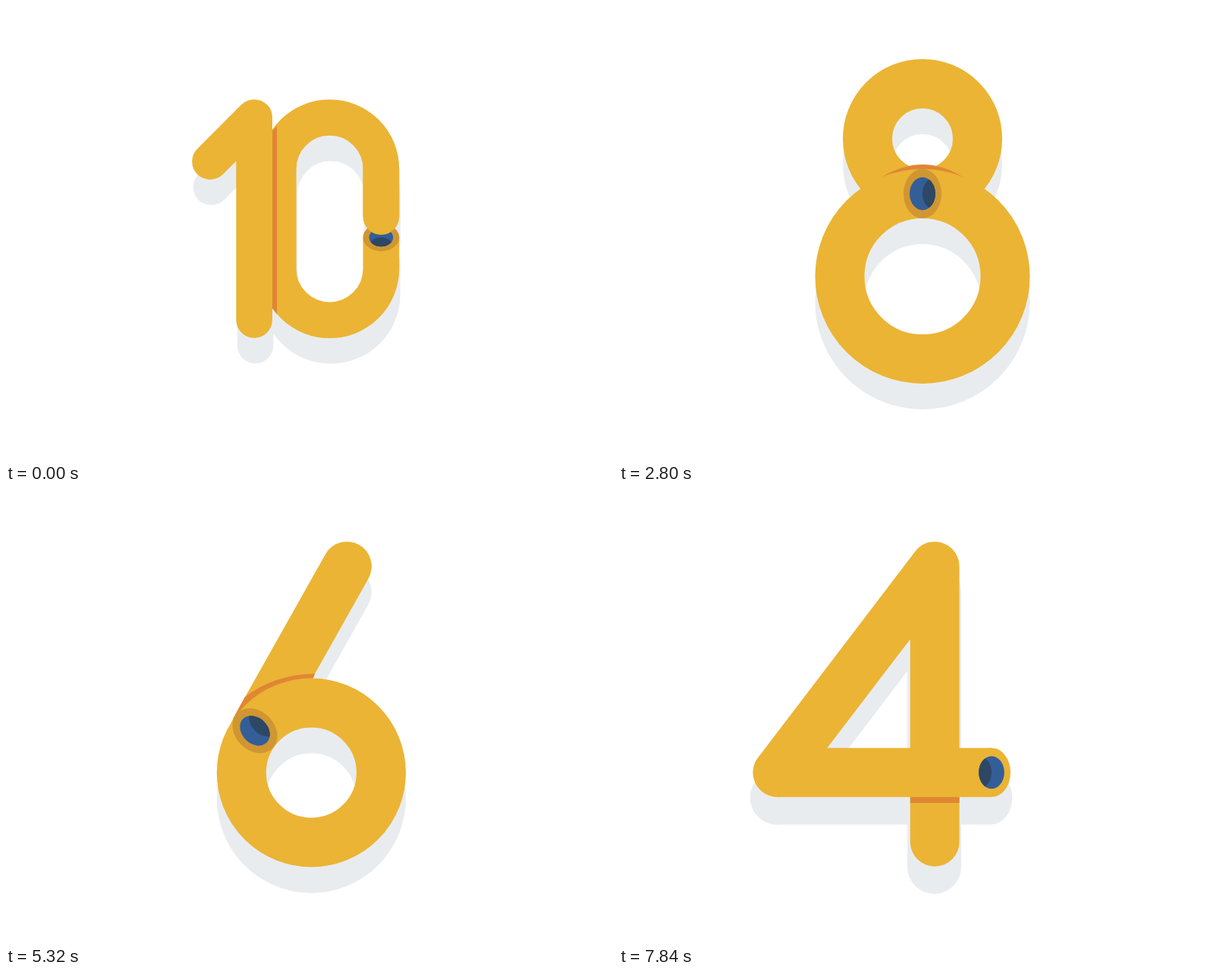
These frames come from a looping animation (800x600 px, 8 s). An HTML page with a canvas:

```html
<!DOCTYPE html>
<html lang="en">
<head>
<meta charset="utf-8">
<title>Countdown</title>
<style>
  html, body { margin: 0; height: 100%; overflow: hidden; background: #fff; }
  canvas { display: block; }
</style>
</head>
<body>
<canvas id="stage" width="800" height="600"></canvas>
<script>
const ctx = document.getElementById('stage').getContext('2d');
const YELLOW = '#ebb434', ORANGE = '#e08635', RIM = '#cf9632';
const BLUE = '#345e98', NAVY = '#2d4764', GREY = '#e9ecef';
const LOOP = 8000, STEP = 70, STEPS_PER_DIGIT = 18;
const POP = [0.767, 0.97, 1.0935, 1.07, 1];

// Every part is a function of the pen: { width, extra, shade }.
const tube = (d, cap = 'round') => {
  const path = new Path2D(d);
  return pen => {
    ctx.lineCap = cap;
    ctx.lineJoin = 'round';
    ctx.lineWidth = pen.width + pen.extra;
    ctx.strokeStyle = pen.shade ? GREY : YELLOW;
    ctx.stroke(path);
  };
};

const ring = (x, y, r) =>
  tube(`M${x - r} ${y}a${r} ${r} 0 1 0 ${2 * r} 0a${r} ${r} 0 1 0 ${-2 * r} 0Z`);

const crease = d => {
  const path = new Path2D(d);
  return pen => {
    if (pen.shade) return;
    ctx.fillStyle = ORANGE;
    ctx.fill(path);
  };
};

function oval(x, rx, ry, color) {
  ctx.beginPath();
  ctx.ellipse(x, 0, rx, ry, 0, 0, 2 * Math.PI);
  ctx.fillStyle = color;
  ctx.fill();
}

// Open end of a tube; its dark inside lies towards the given angle.
const mouth = (x, y, rx, ry, hx, hy, degrees, rim = YELLOW) => pen => {
  const grow = pen.extra / 2;
  ctx.save();
  ctx.translate(x, y);
  ctx.rotate(degrees * Math.PI / 180);
  oval(0, rx + grow, ry + grow, pen.shade ? GREY : rim);
  if (!pen.shade) {
    oval(0, hx, hy, BLUE);
    ctx.clip();
    oval(hx, hx, hy, NAVY);
  }
  ctx.restore();
};

const ten = {
  size: 1.07, center: [384, 298], width: 66.5, shadow: [2, 47, 0],
  parts: [
    tube('M538 308V365.6A94.6 94.6 0 0 1 348.8 365.6V182A94.6 94.6 0 0 1 538 182V270', 'butt'),
    mouth(538, 308, 25.5, 33.3, 17, 22, 90, RIM),
    tube('M538 182V270'),
    crease('M337 113L346.5 103V449.5L337 437Z'),
    tube('M223.6 168.4L304.7 87.3V459.8')
  ]
};

const nine = {
  size: 1.07, center: [400, 300], width: 69.4, shadow: [-2, 42.5, 0],
  parts: [
    tube('M481 247L351.6 477.2'),
    crease('M400 318L512 262L495.5 293Q455 325 396.5 326.2Z'),
    ring(401.7, 187, 98.2),
    mouth(481, 246, 27.6, 35, 18.1, 23.6, 135, RIM)
  ]
};

const eight = {
  size: 1, center: [400, 300], width: 65, shadow: [0, 34, 0],
  parts: [
    ring(400, 175, 72.5),
    crease('M346 226Q400 192 454 226L440 240H360Z'),
    ring(400, 356.5, 109),
    mouth(400, 247.5, 25, 32.5, 17, 21.7, 0, RIM)
  ]
};

const seven = {
  size: 0.767, center: [405, 298], width: 49.5, shadow: [0.5, 25, 0],
  parts: [
    tube('M321 147.6H476', 'butt'),
    tube('M476 147.6L348.6 427'),
    mouth(320.8, 147.6, 19.4, 24.75, 12.8, 16.5, 0)
  ]
};

// The nine turned upside down.
const six = {
  ...nine, size: 1, center: [402, 303], shadow: [0, -36.3, 0],
  place() {
    ctx.translate(402.4, 374);
    ctx.scale(-0.9375, -0.9375);
    ctx.translate(-401.7, -187);
  }
};

const five = {
  size: 1.07, center: [400, 300], width: 69.7, shadow: [0.8, 36, 2.4],
  parts: [
    tube('M322.5 88.7H478.5', 'butt'),
    tube('M322.5 88.7V220'),
    mouth(478.6, 88.8, 27, 34.8, 18, 23, 180),
    crease('M287.7 216V195Q303 173 357.8 168V178L322 220Z'),
    tube('M322.2 220A136.4 136.4 0 1 1 283.8 441.8')
  ]
};

const four = {
  size: 1, center: [328, 300], width: 64.8, shadow: [-0.7, 33.2, 6.2],
  parts: [
    tube('M416.2 465.3V102L209 373.8'),
    crease('M383.8 406H448.6V414H383.8Z'),
    tube('M209 373.8H491', 'butt'),
    tube('M209 373.8h0.01'),
    mouth(491, 373.8, 25, 32.4, 16.8, 21.5, 180)
  ]
};

const digits = [ten, nine, eight, seven, six, five, four];

function drawDigit(digit, scale) {
  const { size, center: [x, y], width, shadow: [dx, dy, extra], parts, place } = digit;
  ctx.save();
  ctx.translate(x, y);
  ctx.scale(scale / size, scale / size);
  ctx.translate(-x, -y);
  if (place) place();

  ctx.save();
  ctx.translate(dx, dy);
  parts.forEach(part => part({ width, extra, shade: true }));
  ctx.restore();

  parts.forEach(part => part({ width, extra: 0, shade: false }));
  ctx.restore();
}

function frame(now) {
  const step = Math.floor((now % LOOP) / STEP);
  const phase = step % STEPS_PER_DIGIT;
  const fromEdge = Math.min(phase, STEPS_PER_DIGIT - 1 - phase, POP.length - 1);
  ctx.clearRect(0, 0, 800, 600);
  drawDigit(digits[Math.floor(step / STEPS_PER_DIGIT)], POP[fromEdge]);
}

let start;
function tick(now) {
  start ??= now;
  frame(Math.max(0, now - start));
  requestAnimationFrame(tick);
}
frame(0);
requestAnimationFrame(tick);
</script>
</body>
</html>
```
